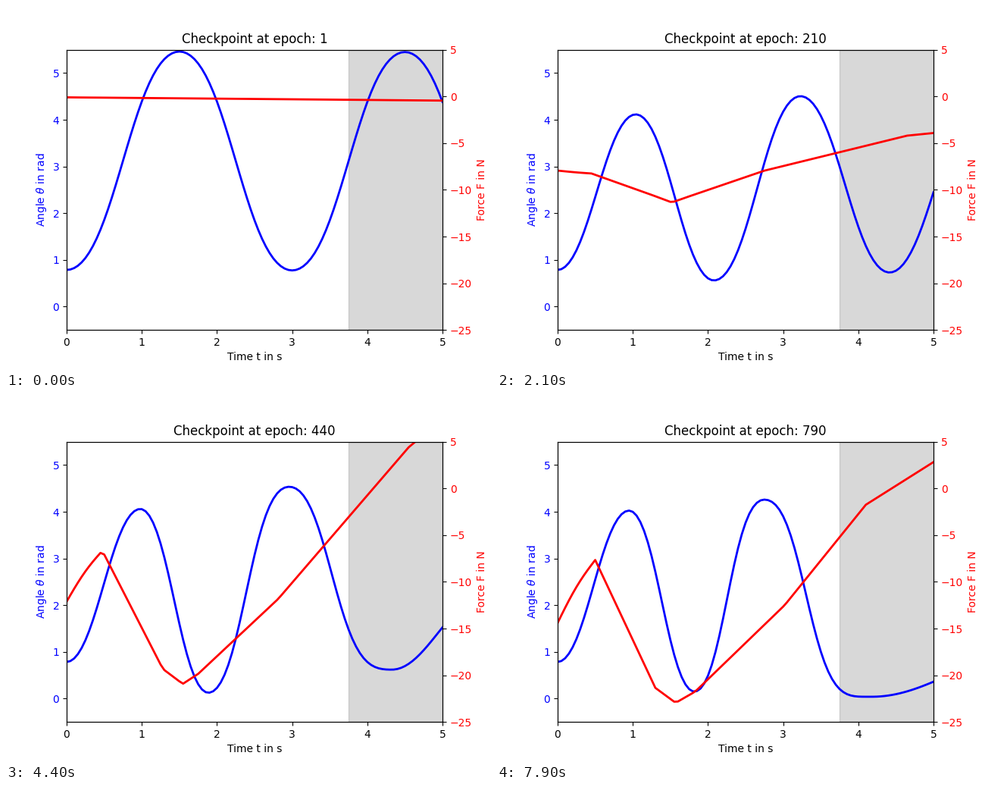
These frames come from a looping animation (640 px wide and 480 px high, 8000 ms). A matplotlib script:

```python
import numpy as np
import matplotlib.pyplot as plt
from matplotlib.animation import FuncAnimation

FRAMES, STEP_MS = 80, 100
T = np.linspace(0, 5, 101)
KEYS = [0, 13, 21, 34, 54, 79]   # stages of the training

# Turning points of the swing at each stage: times, then angles
free = [1.5 * np.arange(1, 6), [5.46, .775, 5.45, .775, 5.45]]
TURNS = np.array([
    free,
    [[1.04, 2.09, 3.236, 4.41, 5.57], [4.115, .785, 4.475, .845, 4.42]],
    [[1.04, 2.08, 3.23, 4.415, 5.64], [4.115, .56, 4.505, .73, 4.45]],
    [[1.0, 1.94, 3.11, 4.40, 5.67], [4.095, .09, 4.75, 1.04, 4.10]],
    [[.96, 1.83, 2.81, 4.25, 5.4], [4.025, .16, 4.32, .20, .20]],
    [[.95, 1.82, 2.75, 4.18, 6.2], [4.025, .15, 4.26, .04, .95]],
])

# Bends of the force line; their times only move in the last stages
BEND_TIMES = np.array([
    [0, .45, 1.27, 1.52, 1.75, 2.75, 4.65, 5],
    [0, .5, 1.29, 1.57, 1.75, 2.88, 4.45, 5],
    [0, .5, 1.30, 1.57, 1.83, 3.02, 4.10, 5],
])
BENDS = np.array([
    -.1 - .07 * BEND_TIMES[0],
    [-8.97, -9, -8.89, -8.86, -8.33, -6.22, -5.12, -5.23],
    [-7.94, -8.25, -10.6, -11.35, -10.7, -7.95, -4.2, -3.92],
    [-10.7, -5.79, -18, -19.75, -18.4, -10.95, 6.4, 9.5],
    [-13.54, -7.57, -20.65, -22.1, -21.3, -12.7, 2.4, 5.35],
    [-14.4, -7.66, -21.35, -22.95, -21.75, -12.5, -1.75, 2.82],
])


def progress(frame):
    """Stage number with fraction; the first and last stage ease out."""
    k = min(np.searchsorted(KEYS, frame, side="right"), len(KEYS) - 1) - 1
    u = (frame - KEYS[k]) / (KEYS[k + 1] - KEYS[k])
    if k in (0, len(KEYS) - 2):
        u *= 2 - u
    return k + u


def blend(rows, p):
    k = min(int(p), len(rows) - 2)
    return rows[k] + (rows[k + 1] - rows[k]) * (p - k)


def angle_curve(p):
    """Pendulum half-waves from turning point to turning point."""
    times, angles = blend(TURNS, p)
    times = np.append(0, times)
    angles = np.append(.785, angles)
    # the second rise and fall start ever more steeply as control is learned
    fall = np.interp(p, [2, 3, 4], [0, .3, 1.1])
    skew = np.array([0, 0, min(fall, .2), fall, 0])

    i = np.searchsorted(times, T, side="right") - 1
    s = (T - times[i]) / (times[i + 1] - times[i])
    s += skew[i] * s ** 2 * (1 - s)
    mid = (angles[i] + angles[i + 1]) / 2
    amp = (angles[i] - angles[i + 1]) / 2
    wave = np.cos(np.pi * s)
    third = np.cos(3 * np.pi * s)
    return mid + amp * (wave + amp ** 2 / 192 * (wave - third))


def force_curve(p):
    times = blend(BEND_TIMES, max(p - 3, 0))
    force = blend(BENDS, p)
    # the first rise is slightly bowed
    bow = .07 * (force[1] - force[0]) * np.sin(np.pi * np.minimum(T / times[1], 1))
    return np.interp(T, times, force) + bow


fig, ax = plt.subplots(figsize=(6.4, 4.8), dpi=100)
ax.set_xlim(0, 5)
ax.set_ylim(-0.5, 5.5)
ax.set_xlabel("Time t in s")
ax.set_ylabel(r"Angle $\theta$ in rad", color="blue")
ax.tick_params(axis="y", labelcolor="blue")
ax.axvspan(3.75, 5, color="gray", alpha=0.3)
title = ax.set_title("")
angle_line, = ax.plot([], [], color="blue", lw=2)

ax2 = ax.twinx()
ax2.set_ylim(-25, 5)
ax2.set_ylabel("Force F in N", color="red")
ax2.tick_params(axis="y", labelcolor="red")
force_line, = ax2.plot([], [], color="red", lw=2)


def draw(frame):
    p = progress(frame)
    angle_line.set_data(T, angle_curve(p))
    force_line.set_data(T, force_curve(p))
    title.set_text(f"Checkpoint at epoch: {max(1, 10 * frame)}")
    return angle_line, force_line, title


anim = FuncAnimation(fig, draw, frames=FRAMES, interval=STEP_MS,
                     repeat=True, repeat_delay=0, blit=False)
plt.show()
```
